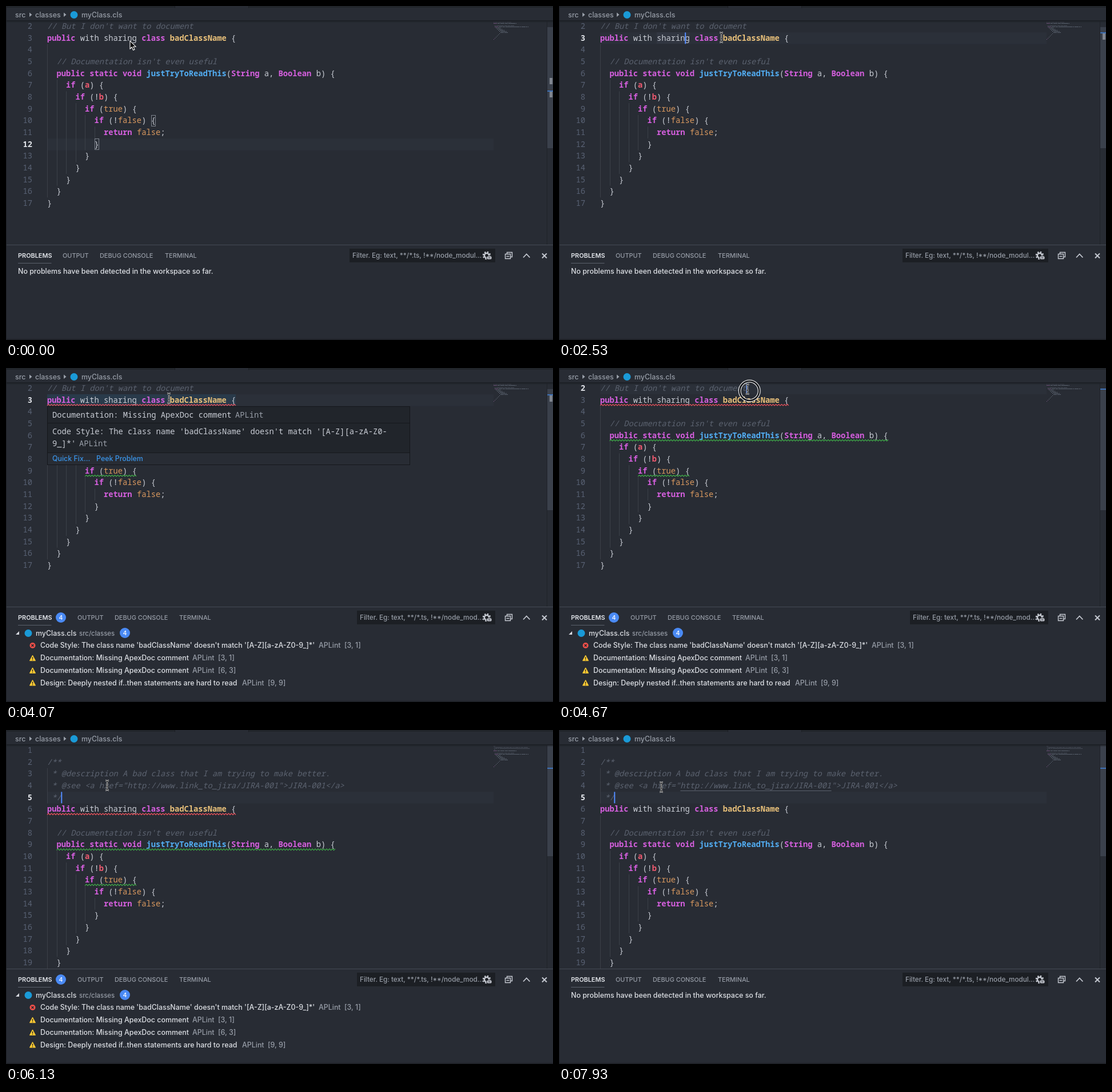
Recreate the animation shown at these times as an HTML page. Size 957 by 585 pixels, loop 8000 ms.

```html
<!DOCTYPE html>
<html lang="en">
<head>
<meta charset="utf-8">
<title>Editor linting demo</title>
<style>
html, body { margin: 0; width: 100%; height: 100%; overflow: hidden; background: #282c34; }
svg { display: block; width: 100vw; height: 100vh; }
text { white-space: pre; }
.mono { font: 500 13.76px "Noto Sans Mono", "DejaVu Sans Mono", monospace; }
.ui { font: 500 12.42px Inter, "Open Sans", sans-serif; }
.kw { fill: #d55fde; font-weight: 600; }
.lit { fill: #d8985f; }
.cls { fill: #e8c07a; font-weight: 600; }
.fn { fill: #52adf2; font-weight: 600; }
.arg { fill: #ef596f; font-weight: 600; }
.com { fill: #5c6370; font-style: italic; }
.plain { fill: #c8ccd4; }
.num { fill: #596274; text-anchor: end; }
.on { fill: #e2e5ea; font-weight: 600; }
.hi { fill: #dcdfe4; }
.dim { fill: #979da7; }
.tab { font-size: 10.9px; }
.link { fill: #3a94e8; }
.badge { fill: #fff; font-size: 10.5px; text-anchor: middle; }
.line { fill: none; }
</style>
</head>
<body>
<svg id="stage" viewBox="0 0 957 585" preserveAspectRatio="none"></svg>
<script>
const LOOP = 8000, CH = 8.257, LH = 20.67, LEFT = 72;
const CLICK = 200, LINT = 2600, HOVER = 3000, LEAVE = 4330,
      PRESS = 4660, RELEASE = 5330, PASTE = 5730, LINK = 6730, CLEAR = 7530;

const body = `public with sharing class badClassName {

  // Documentation isn't even useful
  public static void justTryToReadThis(String a, Boolean b) {
    if (a) {
      if (!b) {
        if (true) {
          if (!false) {
            return false;
          }
        }
      }
    }
  }
}`.split('\n');
const before = ['', "// But I don't want to document", ...body];
const after = ['', '/**',
  ' * @description A bad class that I am trying to make better.',
  ' * @see <a href="http://www.link_to_jira/JIRA-001">JIRA-001</a>',
  ' */', ...body];

const colX = c => LEFT + c * CH;
const esc = s => s.replace(/&/g, '&amp;').replace(/</g, '&lt;');
const text = (x, y, s, cls) => `<text x="${x}" y="${y}" class="${cls}">${esc(s)}</text>`;
const rect = (x, y, w, h, fill, more = '') =>
  `<rect x="${x}" y="${y}" width="${w}" height="${h}" fill="${fill}" ${more}/>`;
const path = (d, stroke, width = 1, more = '') =>
  `<path d="${d}" class="line" stroke="${stroke}" stroke-width="${width}" ${more}/>`;
const dot = (x, y, r, fill) => `<circle cx="${x}" cy="${y}" r="${r}" fill="${fill}"/>`;
const ring = (x, y, r, stroke, width, more = '') =>
  `<circle cx="${x}" cy="${y}" r="${r}" class="line" stroke="${stroke}" stroke-width="${width}" ${more}/>`;
const group = (id, s) => `<g id="${id}">${s}</g>`;

const rules = [
  ['kw', /^(public|static|void|class|String|Boolean|if|return)\b/],
  ['lit', /^(true|false)\b/],
  ['cls', /^badClassName/],
  ['fn', /^justTryToReadThis/],
  ['plain', /^(\w+|[^\w\s]+|\s+)/]
];

function codeLine(s, y) {
  if (/^\s*(\/|\*)/.test(s)) {
    const pad = s.search(/\S/);
    return text(colX(pad), y, s.slice(pad), 'com');
  }
  let out = '', c = 0;
  while (c < s.length) {
    const rest = s.slice(c);
    let [cls, re] = rules.find(r => r[1].test(rest));
    const word = rest.match(re)[0];
    if (/^[ab]$/.test(word) && /[(!]/.test(s[c - 1])) cls = 'arg';
    if (word.trim()) out += text(colX(c), y, word, cls);
    c += word.length;
  }
  return out;
}

function squiggle(c0, c1, y, color) {
  let d = `M${colX(c0)} ${y}`;
  for (let x = colX(c0), i = 0; x < colX(c1) - 2; x += 2.5, i++) d += `l2.5 ${i % 2 ? 2.4 : -2.4}`;
  return path(d, color, 1.2);
}

function doc(id, lines, top) {
  const y = n => 40 + (n - top) * LH;
  const shift = lines.length - body.length;
  let guides = '', code = '', nums = '', mini = '';
  const guide = (level, a, b) => {
    const x = Math.round(colX(level * 2)) + .5;
    guides += `M${x} ${y(a) - 14.6}V${y(b) + 6}`;
  };
  for (let k = 0; k < 6; k++) guide(k, shift + (k ? 4 + k : 2), shift + 14 - k);
  if (shift > 2) guide(0, 3, 5);
  lines.forEach((s, i) => {
    const n = i + 1;
    if (n < top) return;
    nums += `<text x="46" y="${y(n)}" class="num" data-n="${n}">${n}</text>`;
    code += codeLine(s, y(n));
    for (const m of s.matchAll(/\S+/g)) {
      const color = /^\s*(\/|\*)/.test(s) ? '#5c6370' : m.index < 3 ? '#9a6aa5' : '#7d8796';
      mini += path(`M${853 + m.index} ${24.5 + 2 * n}h${m[0].length}`, color, 1,
        'opacity=".75" stroke-dasharray="1.6 .5"');
    }
  });
  const marks = squiggle(0, 40, y(shift + 1) + 5.2, '#e8505a') +
    squiggle(2, 61, y(shift + 4) + 5.2, '#3fae48') +
    squiggle(8, 19, y(shift + 7) + 5.2, '#3fae48');
  return group(id, path(guides, '#3b4048') + code + nums + group(id + 'Marks', marks) + mini);
}

function folds() {
  return [3, 6, 7, 8, 9, 10].map(n => {
    const y = Math.round(40 + (n - 2) * LH) - 8.5;
    return path(`M56.5 ${y}h9v9h-9zM58.5 ${y + 4.5}h5`, '#7b818c');
  }).join('');
}

function tooltip() {
  return rect(72.5, 67.5, 634, 102, '#21252b', 'stroke="#15171b"') +
    rect(73, 148, 633, 21, '#282c34') +
    path('M73 96.5H706M73 148.5H706', '#16181c') +
    `<g class="mono">` +
    text(81, 87, 'Documentation: Missing ApexDoc comment', 'plain') + text(401, 87, 'APLint', 'dim') +
    text(81, 116, "Code Style: The class name 'badClassName' doesn't match '[A-Z][a-zA-Z0-", 'plain') +
    text(81, 137, "9_]*'", 'plain') + text(128, 137, 'APLint', 'dim') + `</g>` +
    text(81, 163, 'Quick Fix...', 'ui link') + text(158, 163, 'Peek Problem', 'ui link');
}

function panel(id, tabs, boxX, hint, content) {
  return group(id, tabs.map(([x, s]) => text(x, 441, s, 'tab dim')).join('') +
    rect(boxX, 425, 856 - boxX, 24, '#1c1f24') +
    `<text x="${boxX + 5}" y="441.3" class="dim" style="font-size:11.7px">${hint}</text>` + content);
}

const badge = (x, y) => dot(x, y, 9, '#4a8af4') + text(x, y + 4, '4', 'badge');
const warning = y => `<path d="M46.5 ${y - 4.5}l5 9.5h-10z" fill="#fc3" stroke="#fc3" stroke-linejoin="round"/>` +
  path(`M46.5 ${y - 1.5}v3.5m0 1v1.3`, '#222', 1.4);
const failure = y => dot(46.5, y, 5, '#f0504a') +
  path(`M44.5 ${y - 2}l4 4m0 -4l-4 4`, '#22252b', 1.4);

function problems() {
  const rows = [
    ["Code Style: The class name 'badClassName' doesn't match '[A-Z][a-zA-Z0-9_]*'", 547, '[3, 1]'],
    ['Documentation: Missing ApexDoc comment', 326, '[3, 1]'],
    ['Documentation: Missing ApexDoc comment', 326, '[6, 3]'],
    ['Design: Deeply nested if..then statements are hard to read', 413, '[9, 9]']
  ];
  return badge(96, 437) + badge(208, 464) + dot(39, 464.5, 6.5, '#1a9ad7') +
    '<path d="M17 467h6v-6z" fill="#d7dae0"/>' +
    text(52, 468.5, 'myClass.cls', 'hi') +
    '<text x="128" y="468.5" class="dim" style="font-size:11.4px">src/classes</text>' +
    rows.map(([msg, x, pos], i) => {
      const y = 486 + i * 21.7;
      return (i ? warning(y) : failure(y)) + text(60, y + 4.4, msg, 'hi') +
        text(x, y + 4.4, 'APLint', 'dim') + text(x + 45, y + 4.4, pos, 'dim');
    }).join('');
}

function chrome() {
  const chevron = x => `<path d="M${x} 11.5l4.5 3.7l-4.5 3.7z" fill="#9aa0aa"/>`;
  return rect(0, 0, 957, 26, '#282c34') + rect(0, 0, 957, 3, '#21252b') + rect(296, 0, 128, 3, '#282c34') +
    path('M295.5 0V3.5M424.5 0V3.5', '#1a1d22') +
    rect(0, 25, 957, 2, '#1d2026') + rect(0, 27, 957, 2, '#1d2026', 'opacity=".35"') +
    `<g class="ui">` + text(16, 19.5, 'src', 'dim') + chevron(41) + text(51, 19.5, 'classes', 'dim') +
    chevron(101) + text(132, 19.5, 'myClass.cls', 'dim') + '</g>' + dot(119, 15.5, 6.5, '#1a9ad7');
}

function icons() {
  const s = '#c5c9d1';
  return ring(841, 437, 5.8, s, 3, 'stroke-dasharray="2.4 2.15"') + ring(841, 437, 4, s, 2.5) +
    rect(841, 438, 9, 6, s, 'rx="2" stroke="#1c1f24"') + path('M843.5 441h4', '#1c1f24') +
    path('M876.5 434.5v-3h9v8h-3M873.5 434.5h9v8h-9zM875.5 438.5h5', s, 1.4) +
    path('M905 440.5l5.7 -6l5.7 6', s, 1.8) +
    path('M938 433.5l8 8m0 -8l-8 8', s, 2);
}

const beam = 'M-3 -8.5Q0 -8.5 0 -6V6Q0 8.5 -3 8.5M3 -8.5Q0 -8.5 0 -6M0 6Q0 8.5 3 8.5M-2 2H2';
const stage = document.getElementById('stage');
stage.innerHTML =
  rect(0, 0, 957, 585, '#282c34') +
  '<rect id="row" x="72" width="781" height="20.67" fill="#2b3039"/>' +
  rect(171, 46, 58, 20, '#313641', 'id="word"') +
  rect(72, 46, 330, 20, '#293a4a', 'id="range"') +
  '<rect id="sel" y="25.5" height="20.67" fill="#3d4a5d"/>' +
  `<g class="mono">` + doc('old', before, 2) + doc('new', after, 1) + '</g>' +
  group('braces', rect(254.5, 191.5, 7, 19, 'none', 'stroke="#7d838d"') + rect(155.5, 232.5, 7, 19, 'none', 'stroke="#7d838d"')) +
  path(`M${colX(17)} 106.5H${colX(49)}`, '#5c6370', 1, 'id="url"') +
  group('folds', folds()) +
  '<rect id="caret" width="2" height="20" fill="#528bff"/>' +
  path('M946.5 27V418', '#1f2329') +
  '<rect id="slider" x="947" width="10" fill="#3a404b"/>' +
  group('pairs', rect(951, 126, 5, 11, '#7f858f') + rect(951, 149, 5, 11, '#7f858f')) +
  rect(951, 48, 5, 11, '#7f858f', 'id="tick"') +
  '<rect id="ruler" x="947" width="10" height="2" fill="#3f72b8"/>' +
  chrome() +
  group('tip', tooltip()) +
  rect(0, 418, 957, 167, '#282c34') + path('M0 418.5H957', '#454a54') +
  path('M21 450.5H79.5', '#5b616c') +
  `<g class="ui">` + text(21, 441, 'PROBLEMS', 'tab on') +
  panel('clean', [[99, 'OUTPUT'], [164, 'DEBUG CONSOLE'], [278, 'TERMINAL']], 601,
    'Filter. Eg: text, **/*.ts, !**/node_modul...',
    text(21, 468.5, 'No problems have been detected in the workspace so far.', 'hi')) +
  panel('issues', [[125, 'OUTPUT'], [190, 'DEBUG CONSOLE'], [303, 'TERMINAL']], 614,
    'Filter. Eg: text, **/*.ts, !**/node_mod...', problems()) +
  '</g>' + icons() +
  rect(0, 0, 1, 585, '#1d2026') + rect(0, 583, 957, 2, '#1f2228') +
  group('press', ring(0, 0, 17, '#e8e8e8', 5) + ring(0, 0, 17, '#15171b', 2.6)) +
  group('arrow', '<path d="M0 0V14L3.2 11L5.5 16.2L8 15.1L5.7 10.2H10Z" fill="#000" stroke="#fff" stroke-width="1.1"/>') +
  group('beam', path(beam, '#e4e4e4', 2.4) + path(beam, '#111'));

const el = {};
stage.querySelectorAll('[id]').forEach(e => el[e.id] = e);
const numbers = [...stage.querySelectorAll('.num')];

const show = (id, on) => el[id].setAttribute('visibility', on ? 'inherit' : 'hidden');
const set = (id, attrs) => { for (const k in attrs) el[id].setAttribute(k, attrs[k]); };
const place = (id, x, y) => set(id, { transform: `translate(${x} ${y})` });
const ease = p => p * p * (3 - 2 * p);

// time, x, y of the pointer
const route = [
  [0, 217, 61], [400, 217, 60], [900, 286, 55], [1700, 286, 55], [2500, 284, 55],
  [4000, 285, 53], [4300, 285, 53], [4640, 330, 37], [4730, 329, 37], [5130, 12, 36],
  [5400, 12, 36], [6050, 177, 97], [7000, 177, 97], [7900, 179, 100], [LOOP, 179, 100]
];

function pointer(t) {
  const i = route.findIndex(p => p[0] > t);
  const [t0, x0, y0] = route[i - 1], [t1, x1, y1] = route[i];
  const p = ease((t - t0) / (t1 - t0));
  return [x0 + (x1 - x0) * p, y0 + (y1 - y0) * p];
}

function draw(t) {
  const [x, y] = pointer(t);
  const pasted = t >= PASTE, picking = t >= PRESS && !pasted;
  const lint = t >= LINT && t < CLEAR, hover = t >= HOVER && t < LEAVE;
  const line = t < CLICK ? 12 : pasted ? 5 : picking ? 2 : 3;
  const rowY = 25.4 + (line - (pasted ? 1 : 2)) * LH;

  show('old', !pasted);
  show('new', pasted);
  show('oldMarks', !pasted && lint);
  show('newMarks', pasted && lint);
  numbers.forEach(n => n.classList.toggle('on', +n.dataset.n === line));

  const end = colX(31);
  const from = Math.max(LEFT, Math.min(end, LEFT + Math.round((x - LEFT) / CH) * CH));
  show('sel', picking);
  set('sel', { x: from, width: end - from });
  show('row', !picking || from >= end);
  set('row', { y: rowY });
  show('word', t >= CLICK + 250 && t < PRESS);
  show('range', hover);
  show('tip', hover);
  show('braces', t < CLICK);
  show('url', t >= LINK);
  show('folds', x < 68 && !pasted);

  const origin = pasted ? PASTE : picking ? PRESS : CLICK;
  const dragging = picking && t < RELEASE;
  show('caret', t >= CLICK && (dragging || (t - origin) % 1000 < 500));
  set('caret', { x: (pasted ? colX(3) : picking ? from : colX(18)) - .5, y: rowY + .3 });

  set('slider', pasted ? { y: 26, height: 195 } : { y: 37, height: 212 });
  show('pairs', t < CLICK);
  show('tick', t >= CLICK && t < PRESS);
  set('ruler', { y: t < CLICK ? 148 : pasted ? 66 : picking ? 36 : 46 });

  show('issues', lint);
  show('clean', !lint);

  const arrow = t < CLICK + 60 || x < 68;
  show('arrow', arrow);
  show('beam', !arrow);
  place('arrow', x, y);
  place('beam', x, y);
  show('press', (t >= CLICK - 60 && t < CLICK + 60) || dragging);
  place('press', x + 3.5, y + 3);
}

const start = performance.now();
function tick() {
  draw((performance.now() - start) % LOOP);
  requestAnimationFrame(tick);
}
tick();
</script>
</body>
</html>
```
